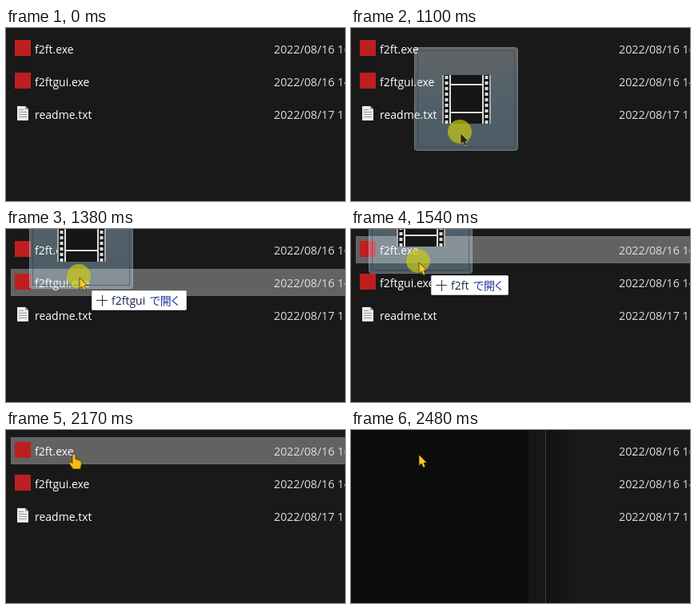
These frames come from a looping animation (424x217 px, 2.53 s). An HTML page:

```html
<!DOCTYPE html>
<html lang="ja">
<head>
<meta charset="utf-8">
<style>
  html, body { margin: 0; width: 100%; height: 100%; overflow: hidden; background: #191919; }
  svg { display: block; width: 424px; height: 217px; }
  text { font: 14px "Open Sans", "Noto Sans CJK JP", "Noto Sans CJK", sans-serif; fill: #fff; }
  .date { font-size: 14.3px; fill: #dedede; }
  .row { fill: #626262; stroke: #6a6a6a; }
  #panel { mix-blend-mode: screen; }
  #tip text { fill: #1c2450; font-feature-settings: "palt"; }
  #tip tspan { fill: #1a36a0; }
  #tip .kana { font-size: 12px; letter-spacing: -1.2px; }
  .film { fill: none; stroke: #dcdcdc; stroke-width: 2; }
</style>
</head>
<body>
<svg viewBox="0 0 424 217">
  <defs>
    <linearGradient id="glass" x2="0" y2="1">
      <stop stop-color="#535353"/>
      <stop offset=".35" stop-color="#42515a"/>
      <stop offset="1" stop-color="#374a55"/>
    </linearGradient>
    <linearGradient id="shade">
      <stop stop-color="#000" stop-opacity=".3"/>
      <stop offset="1" stop-color="#000" stop-opacity="0"/>
    </linearGradient>
    <path id="arrow" d="M0 0V14L3 11L5.5 16L8 15L6 10H10Z"/>
    <g id="strip" class="film">
      <path d="M1 0V61" stroke-width="1.5"/>
      <path d="M5.5 1V61" stroke-width="4" stroke-dasharray="4 3"/>
      <path d="M10 0V61"/>
    </g>
  </defs>

  <path d="M0 0H424V217H0Z" fill="#191919"/>
  <rect id="row1" class="row" x="6.5" y="9.5" width="430" height="33"/>
  <rect id="row2" class="row" x="6.5" y="50.5" width="430" height="33"/>
  <g id="files"></g>
  <g transform="translate(14 98)">
    <path d="M0 0H10L14 4V18H0Z" fill="#ececec"/>
    <path d="M10 0V4H14Z" fill="#a8a8a8"/>
    <path d="M2 4.5H8M2 7.5H12M2 10.5H12M2 13.5H12" stroke="#9a9a9a"/>
  </g>

  <rect id="panel" x=".5" y=".5" width="129" height="129" rx="3" fill="url(#glass)" stroke="#5a6a72"/>
  <g id="film">
    <rect x="4.500" y="4.500" width="121" height="121" fill="none" stroke="#2c3439" stroke-opacity=".45"/>
    <g transform="translate(35 35)">
      <path d="M0 0H61V61H0Z" fill="#161616"/>
      <use href="#strip"/>
      <use href="#strip" transform="matrix(-1 0 0 1 61 0)"/>
      <path class="film" d="M11 12H50M11 47H50"/>
    </g>
  </g>

  <g id="console">
    <path d="M244 -400H284V700H244Z" fill="url(#shade)"/>
    <path d="M-740 -400H222V700H-740Z" fill="#0c0c0c"/>
    <path d="M222 -400H243V700H222Z" fill="#171717"/>
    <path d="M243.5 -400V700" stroke="#3c3c3c"/>
  </g>

  <g id="tip">
    <rect x=".5" y=".5" height="24" rx="1" fill="#fff" stroke="#d0d0d0"/>
    <path d="M6 12.5H20M13.5 6V20" stroke="#333"/>
    <text x="25" y="18"></text>
  </g>

  <g id="cursor">
    <circle id="press" cx="-1" cy="-2" r="15" fill="#c8c814" fill-opacity=".7"/>
    <use id="pointer" href="#arrow" stroke-width=".7"/>
    <path id="hand" d="M-2 0Q0 -2 2 0V6Q4 4 5 7Q7 6 8 8Q10 8 9.5 11L8 18H-1L-6 11Q-6 8 -4 9L-2 11Z"
          fill="#fdb813" stroke="#3a2a06" stroke-width=".7"/>
  </g>
</svg>

<script>
const LOOP = 2530, DRAG = 900, DROP = 1660, OPEN = 2170;
const $ = id => document.getElementById(id);

$("files").innerHTML = [
  ["f2ft.exe", "2022/08/16 16:02"],
  ["f2ftgui.exe", "2022/08/16 14:38"],
  ["readme.txt", "2022/08/17 11:20"]
].map(([name, date], i) => `
  ${i < 2 ? `<rect x="11" y="${15 + 41 * i}" width="20" height="20" fill="#bd1f20"/>` : ""}
  <text x="36" y="${32 + 41 * i}">${name}</text>
  <text class="date" x="335" y="${32 + 41 * i}">${date}</text>`).join("");

// time, x, y
const thumbPath = [[900, 281, 209], [940, 222, 155], [1000, 150, 88], [1100, 79, 24],
  [1260, 37, -30], [1420, 26, -63], [1540, 22, -74], [1660, 21, -86]];
const cursorPath = [[900, 340, 320], [940, 281, 265], [1000, 209, 197], [1100, 137, 132],
  [1260, 101, 86], [1420, 89, 52], [1540, 85, 42], [1660, 85, 31]];

// start time, box width, target, action, class of the action
const tips = [[1180, 103, "f2ft", "へコピー", "kana"], [1300, 118, "f2ftgui", "で開く", ""],
  [1460, 96, "f2ft", "で開く", ""]];

const ramp = (t, a, b) => Math.min(1, Math.max(0, (t - a) / (b - a)));

function along(path, t) {
  const i = path.findIndex(k => k[0] >= t);
  const end = i < 0 ? path.length - 1 : Math.max(1, i);
  const [a, x, y] = path[end - 1], [b, u, v] = path[end];
  const p = ramp(t, a, b);
  return [x + (u - x) * p, y + (v - y) * p];
}

const place = (id, x, y) => $(id).setAttribute("transform", `translate(${Math.round(x)} ${Math.round(y)})`);
const show = (id, alpha) => $(id).style.opacity = Number(alpha);

function step(t) {
  if (t < DRAG) return 0;
  const [start, size] = t < OPEN ? [DRAG, 40] : [OPEN, 310 / 7];
  return start + Math.floor((t - start) / size + 1e-6) * size;
}

function drawTip(t, x, y) {
  const tip = tips.findLast(k => t >= k[0]);
  show("tip", Boolean(tip) && t < DROP);
  if (!tip) return;
  const [, width, target, action, kind] = tip;
  place("tip", x + 15, y + 16);
  $("tip").querySelector("rect").setAttribute("width", width);
  $("tip").querySelector("text").innerHTML = `${target} <tspan dx="2" class="${kind}">${action}</tspan>`;
}

function draw(time) {
  const t = step(time);
  const dragging = t >= DRAG && t < DROP;
  const [x, y] = along(cursorPath, t);

  show("row1", ramp(t, 1430, 1520) * (1 - ramp(t, 2210, 2340)));
  show("row2", ramp(t, 1290, 1360) * (1 - ramp(t, 1430, 1500)));

  for (const id of ["panel", "film"]) {
    place(id, ...along(thumbPath, t));
    show(id, dragging);
  }
  drawTip(t, x, y);

  place("cursor", x, y);
  show("cursor", t >= DRAG);
  show("press", dragging);
  const pointing = t >= 1730 && t < 2210;
  show("hand", pointing);
  show("pointer", !pointing);
  const [fill, stroke] = t < 1180 ? ["#25250c", "#c9c85a"] : ["#ffc828", "#2a2208"];
  $("pointer").setAttribute("fill", fill);
  $("pointer").setAttribute("stroke", stroke);

  const p = 1 - (1 - ramp(t, 2190, 2470)) ** 2;
  const scale = 0.92 + 0.08 * p;
  $("console").setAttribute("transform", `translate(-250 150) scale(${scale}) translate(250 -150)`);
  show("console", p);
}

const begin = performance.now();
function frame() {
  draw((performance.now() - begin) % LOOP);
  requestAnimationFrame(frame);
}
frame();
</script>
</body>
</html>
```
